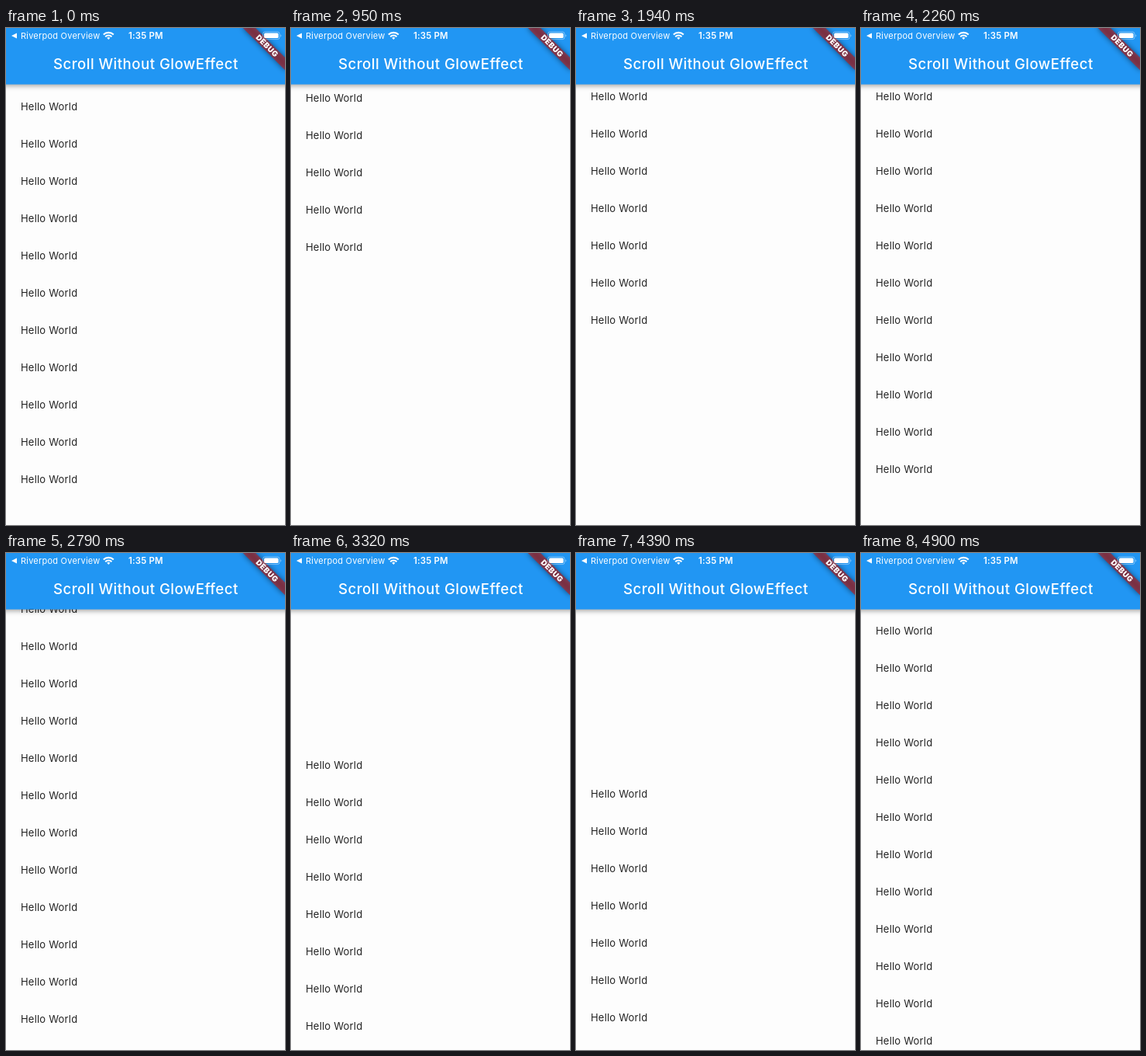
Write an HTML page that moves like this. It is 360 by 640 pixels and loops after 4.94 s.

```html
<!DOCTYPE html>
<html lang="en">
<head>
<meta charset="utf-8">
<title>Scroll Without GlowEffect</title>
<style>
  html, body { margin: 0; width: 100%; height: 100%; overflow: hidden; background: #fdfdfd; }
  svg { display: block; width: 360px; height: 640px; font-family: Inter, Roboto, sans-serif; }
  #list { font-size: 13px; letter-spacing: .2px; fill: #222; }
  .bar { fill: #2196f3; filter: drop-shadow(0 2px 3px rgba(0, 0, 0, .36)); }
  .white { fill: #fff; }
  .glow { fill: rgba(0, 0, 0, .5); filter: blur(3.9px); }
  .debug { font-size: 10.2px; font-weight: 900; letter-spacing: .4px; text-anchor: middle; }
</style>
</head>
<body>
<svg viewBox="0 0 360 640">
  <g id="list"></g>
  <rect class="bar" x="-10" y="-10" width="380" height="82.6"/>
  <g class="white">
    <path d="M7 10l7-3.5v7z"/>
    <text x="19" y="14" font-size="11" letter-spacing=".22">Riverpod Overview</text>
    <text x="158" y="14" font-size="11.4" font-weight="600" letter-spacing=".2">1:35 PM</text>
    <text x="61" y="53" font-size="18.6" font-weight="500" letter-spacing=".48">Scroll Without GlowEffect</text>
  </g>
  <g fill="none" stroke="#fff" stroke-width="2.1">
    <path d="M125.8 8.6a9.2 9.2 0 0 1 13 0M128.2 11.2a5.8 5.8 0 0 1 8.2 0"/>
    <path d="M132.3 15l-2-2.2a2.8 2.8 0 0 1 4 0z" fill="#fff" stroke="none"/>
  </g>
  <g transform="translate(360) rotate(45) scale(.96)">
    <path class="glow" d="M-40 28h80v12h-80z"/>
    <path d="M-40 28h80v12h-80z" fill="#b71c1c" fill-opacity=".627"/>
    <text class="white debug" y="37.6">DEBUG</text>
  </g>
  <rect x="331.5" y="5" width="21.5" height="9.6" rx="2.6" fill="none" stroke="#fff" stroke-opacity=".4"/>
  <rect class="white" x="333" y="6.5" width="18.5" height="6.6" rx="1.5"/>
  <path d="M354.3 8.2q2 1.6 0 3.2z" fill="#fff" fill-opacity=".5"/>
</svg>
<script>
const LOOP = 4940, ITEMS = 20, ROW = 48;
const TOP = 97, BOTTOM = 581 - (ITEMS - 1) * ROW;

// The screen refreshes in evenly spaced runs: [first, last, count].
const runs = [
  [710, 1180, 5], [1290, 1710, 5], [1830, 2260, 5], [2370, 2790, 5],
  [2910, 3320, 5], [3430, 3860, 5], [3980, 4590, 7], [4690, 4900, 3]
];
const ticks = [0, ...runs.flatMap(([from, to, count]) =>
  Array.from({ length: count }, (_, i) => Math.round((from + (to - from) * i / (count - 1)) / 10) * 10))];

const ease = (t, from, to) => {
  const u = Math.min(1, Math.max(0, (t - from) / (to - from)));
  return (1 - Math.cos(Math.PI * u)) / 2;
};

// Drag past the edge, then an overdamped spring back.
function pull(t, from, release, amount) {
  if (t < release) return amount * ease(t, from, release);
  const s = (t - release) / 1000;
  return amount * (1.7 * Math.exp(-9.07 * s) - 0.7 * Math.exp(-22.04 * s));
}

const scroll = t => BOTTOM
  + pull(t, 685, 960, -300)
  + pull(t, 1620, 1856, -300)
  + (TOP - BOTTOM) * ease(t, 2440, 2920)
  + pull(t, 3091, 3440, 239)
  + pull(t, 3920, 4370, 220);

const list = document.getElementById('list');
list.innerHTML = Array.from({ length: ITEMS }, (_, i) =>
  `<text x="19" y="${i * ROW + 5}">Hello World</text>`).join('');

function draw() {
  const now = performance.now() % LOOP;
  const tick = ticks.findLast(t => t <= now);
  list.setAttribute('transform', `translate(0 ${Math.round(scroll(tick))})`);
  requestAnimationFrame(draw);
}
draw();
</script>
</body>
</html>
```
